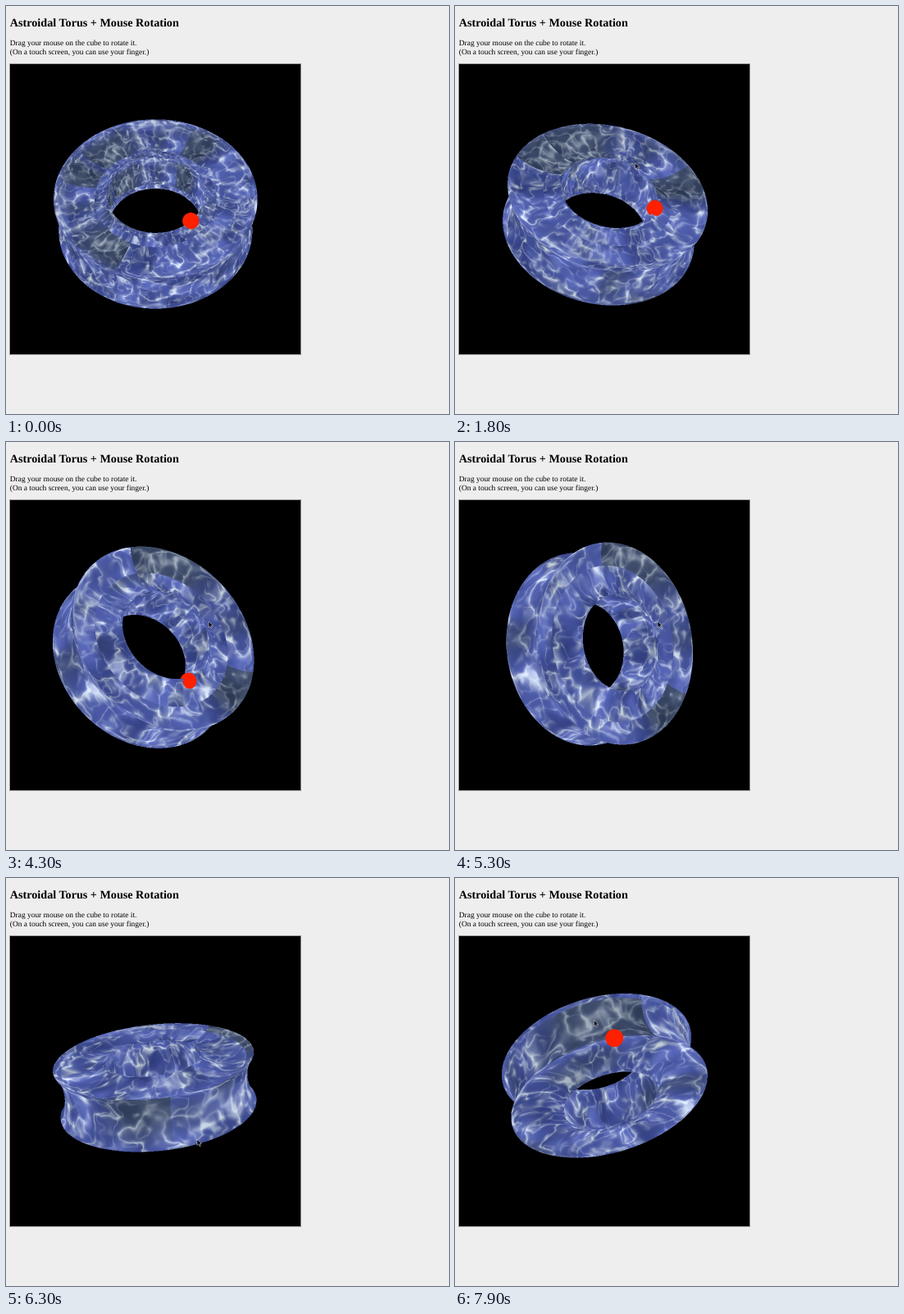
Write an HTML page with a canvas that moves like this. It is 540 px wide and 498 px high and loops after 8000 ms.

```html
<!DOCTYPE html>
<html lang="en">
<head>
<meta charset="utf-8">
<title>Astroidal Torus + Mouse Rotation</title>
<style>
  html, body { margin: 0; width: 100%; height: 100%; overflow: hidden; background: #eee; }
  canvas { position: absolute; left: 5px; top: 71px; width: 354px; height: 354px; background: #000; box-shadow: 0 0 0 1px rgba(0, 0, 0, .35); }
  svg { position: absolute; left: 0; top: 0; }
  text { font: 9.44px "Liberation Serif", "Times New Roman", serif; text-rendering: geometricPrecision; }
  .title { font-size: 14.16px; font-weight: bold; }
</style>
</head>
<body>
<canvas id="view" width="708" height="708"></canvas>
<svg width="540" height="498" viewBox="0 0 540 498">
  <text class="title" x="4.8" y="24.8">Astroidal Torus + Mouse Rotation</text>
  <text x="4.8" y="48.3">Drag your mouse on the cube to rotate it.</text>
  <text x="4.8" y="59.3">(On a touch screen, you can use your finger.)</text>
  <path id="cursor" d="M0 0V7.4L1.8 5.8L3 8.6L4.3 8L3.1 5.3H5.4Z" fill="#000" stroke="#ccd" stroke-width=".6"/>
</svg>
<script>
const LOOP = 8000, STEP = 100;
const SIZE = 708, MID = SIZE / 2, SCALE = 89.3 * 2, EYE = 11;
const CUSP = 0.5 * Math.SQRT1_2, BALL = 0.108;
const NU = 72, NV = 96, TW = 1024, TH = 512;
const RAD = Math.PI / 180;
const BLACK = 0xff000000, RED = 0xff0020ff;

const mix = (a, b, f) => a + (b - a) * f;
const ramp = (t, from, to) => Math.max(0, Math.min(1, (t - from) / (to - from)));

// Moves are { from, to, at }; the value rests between them
function follow(first, moves, t) {
  return moves.reduce((p, m) => p.map((v, i) => mix(v, m.at[i], ramp(t, m.from, m.to))), first);
}
const TURNS = [
  { from: 0, to: 200, at: [0.18, 0.675, 0.716] },
  { from: 3900, to: 4700, at: [0.633, 0.112, 0.766] },
  { from: 5600, to: 6300, at: [-0.1, 0.914, 0.393] },
  { from: 6300, to: 7300, at: [-0.15, 0.6, -0.785] },
  { from: 7300, to: 7900, at: [-0.247, 0.785, -0.568] }
];
const DRAGS = [
  { from: 2500, to: 2900, at: [259.5, 192.5] },
  { from: 3900, to: 4300, at: [247, 219] },
  { from: 5600, to: 6300, at: [233, 319] },
  { from: 6300, to: 7900, at: [169.5, 173.5] }
];

function stateAt(t) {
  // Time spent moving, without the pauses
  const busy = 2500 * ramp(t, 800, 3300) + 1400 * ramp(t, 3900, 5300) + 2400 * ramp(t, 5600, 8000);
  const flip = ramp(t, 5600, 7900);
  return {
    axis: follow([0, 0.605, 0.796], TURNS, t),
    ballU: 180 * (busy / 6300) ** 3,
    ballV: -45 + 16.5 * ramp(t, 0, 200) + busy / 100 - 122 * ramp(t, 3900, 4700),
    turn: 144 - busy / 97 - 145 * flip,
    tube: 330 - busy / 200 - 45 * flip,
    zoom: 0.8 + 0.6 * Math.exp(-busy / 1300),
    pointer: t < 200 ? [-20, -20] : follow([219.5, 191.5], DRAGS, t)
  };
}

// Seeded smooth noise on a 64 x 64 lattice
let seed = 20;
const lattice = Float32Array.from({ length: 4096 }, () => {
  seed = (Math.imul(seed, 1664525) + 1013904223) >>> 0;
  return seed / 4294967296;
});
const cell = (x, y) => lattice[(y & 63) << 6 | x & 63];
const ease = f => f * f * (3 - 2 * f);
function noise(x, y) {
  const xi = Math.floor(x), yi = Math.floor(y), fx = ease(x - xi);
  const top = mix(cell(xi, yi), cell(xi + 1, yi), fx);
  const low = mix(cell(xi, yi + 1), cell(xi + 1, yi + 1), fx);
  return mix(top, low, ease(y - yi));
}
const ridge = (n, p) => Math.pow(1 - Math.abs(2 * n - 1), p);
const fall = (v, size) => v < 0 ? 0 : Math.min(1, 2.5 * Math.max(0, 1 - v / size));

// Rippling water with a few dull patches; it does not tile, so its seams show
function makeWater() {
  const tex = new Uint32Array(TW * TH);
  for (let y = 0; y < TH; y++) for (let x = 0; x < TW; x++) {
    const wx = x + 14 * noise(x / 19, y / 19 + 9) + 5 * noise(x / 8 + 5, y / 8);
    const wy = y + 14 * noise(x / 19 + 30, y / 19) + 5 * noise(x / 8, y / 8 + 40);
    const low = noise(wx / 30 + 17, wy / 30 + 3);
    const glow = noise(wx / 13 + 8, wy / 13 + 21);
    let vein = ridge(noise(wx / 34, wy / 34), 11) * (0.1 + 0.95 * glow);
    vein += ridge(noise(wx / 17 + 40, wy / 17 + 13), 10) * 0.7 * glow;
    vein += 0.75 * Math.pow(noise(wx / 11 + 23, wy / 11 + 35), 5);
    vein = Math.min(1, vein);
    const patch = Math.max(fall(x, 170) * fall(y, 100), fall(x - 310, 100) * fall(y, 120));
    const cloud = 2.5 * (noise(x / 75 + 11, y / 75 + 4) - 0.68);
    const dull = 0.7 * Math.min(1, Math.max(patch, cloud));
    const shine = vein * (1 - 0.4 * dull);
    const r = mix(46 + 44 * low, 42 + 16 * low, dull) + 140 * shine;
    const g = mix(59 + 46 * low, 54 + 18 * low, dull) + 138 * shine;
    const b = mix(122 + 66 * low, 66 + 20 * low, dull) + mix(78, 130, dull) * shine;
    tex[y * TW + x] = BLACK | Math.min(255, b) << 16 | Math.min(255, g) << 8 | Math.min(255, r);
  }
  return tex;
}

const water = makeWater();
const ctx = document.getElementById("view").getContext("2d");
const cursor = document.getElementById("cursor");
const image = ctx.createImageData(SIZE, SIZE);
const pixels = new Uint32Array(image.data.buffer);
const depth = new Float32Array(SIZE * SIZE);
const count = (NU + 1) * (NV + 1);
const [px, py, pz, pu, pv] = Array.from({ length: 5 }, () => new Float32Array(count));

function frameOf([x, y, z]) {
  const len = Math.hypot(x, y, z), n = [x / len, y / len, z / len];
  const w = Math.sqrt(1 - n[0] * n[0]);
  const a = [w, -n[0] * n[1] / w, -n[0] * n[2] / w];
  const b = [0, n[2] * a[0] - n[0] * a[2], n[0] * a[1] - n[1] * a[0]];
  return { n, a, b };
}

// Point of the surface: u runs along the astroid, v around the axis
function surface({ n, a, b }, u, v) {
  const c = Math.cos(u) ** 3, s = Math.sin(u) ** 3;
  const rad = 1 - CUSP * (c + s), h = CUSP * (c - s);
  const ca = rad * Math.cos(v), sb = rad * Math.sin(v);
  return [0, 1, 2].map(i => a[i] * ca + b[i] * sb + n[i] * h);
}

function project([x, y, z]) {
  const k = SCALE * EYE / (EYE - z);
  return [MID + x * k, MID - y * k, z, k];
}

function triangle(i, j, k) {
  const x0 = px[i], y0 = py[i], x1 = px[j], y1 = py[j], x2 = px[k], y2 = py[k];
  const area = (x1 - x0) * (y2 - y0) - (x2 - x0) * (y1 - y0);
  if (Math.abs(area) < 1e-6) return;
  const left = Math.ceil(Math.min(x0, x1, x2)), right = Math.max(x0, x1, x2);
  const top = Math.ceil(Math.min(y0, y1, y2)), bottom = Math.max(y0, y1, y2);
  for (let y = top; y <= bottom; y++) for (let x = left; x <= right; x++) {
    const b = ((x - x0) * (y2 - y0) - (x2 - x0) * (y - y0)) / area;
    const c = ((x1 - x0) * (y - y0) - (x - x0) * (y1 - y0)) / area;
    const a = 1 - b - c;
    if (a < -1e-4 || b < -1e-4 || c < -1e-4) continue;
    const z = a * pz[i] + b * pz[j] + c * pz[k], at = y * SIZE + x;
    if (z <= depth[at]) continue;
    depth[at] = z;
    const tx = (a * pv[i] + b * pv[j] + c * pv[k]) & (TW - 1);
    const ty = (a * pu[i] + b * pu[j] + c * pu[k]) & (TH - 1);
    pixels[at] = water[ty * TW + tx];
  }
}

function drawTorus(frame, turn, tube, zoom) {
  for (let i = 0, p = 0; i <= NU; i++) for (let j = 0; j <= NV; j++, p++) {
    const u = tube * RAD - 2 * Math.PI * i / NU;
    const v = turn * RAD - 2 * Math.PI * j / NV;
    [px[p], py[p], pz[p]] = project(surface(frame, u, v));
    pu[p] = i / NU * zoom * TH;
    pv[p] = j / NV * zoom * TW;
  }
  for (let i = 0; i < NU; i++) for (let j = 0; j < NV; j++) {
    const p = i * (NV + 1) + j, q = p + NV + 1;
    triangle(p, p + 1, q);
    triangle(q, p + 1, q + 1);
  }
}

function drawBall(frame, u, v) {
  const [cx, cy, cz, k] = project(surface(frame, u * RAD, v * RAD));
  const r = BALL * k;
  for (let y = Math.ceil(cy - r); y <= cy + r; y++) for (let x = Math.ceil(cx - r); x <= cx + r; x++) {
    const d = ((x - cx) ** 2 + (y - cy) ** 2) / (r * r), at = y * SIZE + x;
    if (d <= 1 && cz + BALL * Math.sqrt(1 - d) > depth[at]) pixels[at] = RED;
  }
}

function draw(t) {
  const { axis, ballU, ballV, turn, tube, zoom, pointer } = stateAt(t);
  const frame = frameOf(axis);
  pixels.fill(BLACK);
  depth.fill(-100);
  drawTorus(frame, turn, tube, zoom);
  drawBall(frame, ballU, ballV);
  ctx.putImageData(image, 0, 0);
  cursor.setAttribute("transform", `translate(${pointer})`);
}

let shown = -1;
const start = performance.now();
function tick() {
  const t = Math.floor((performance.now() - start) % LOOP / STEP) * STEP;
  if (t !== shown) draw(shown = t);
  requestAnimationFrame(tick);
}
tick();
</script>
</body>
</html>
```
